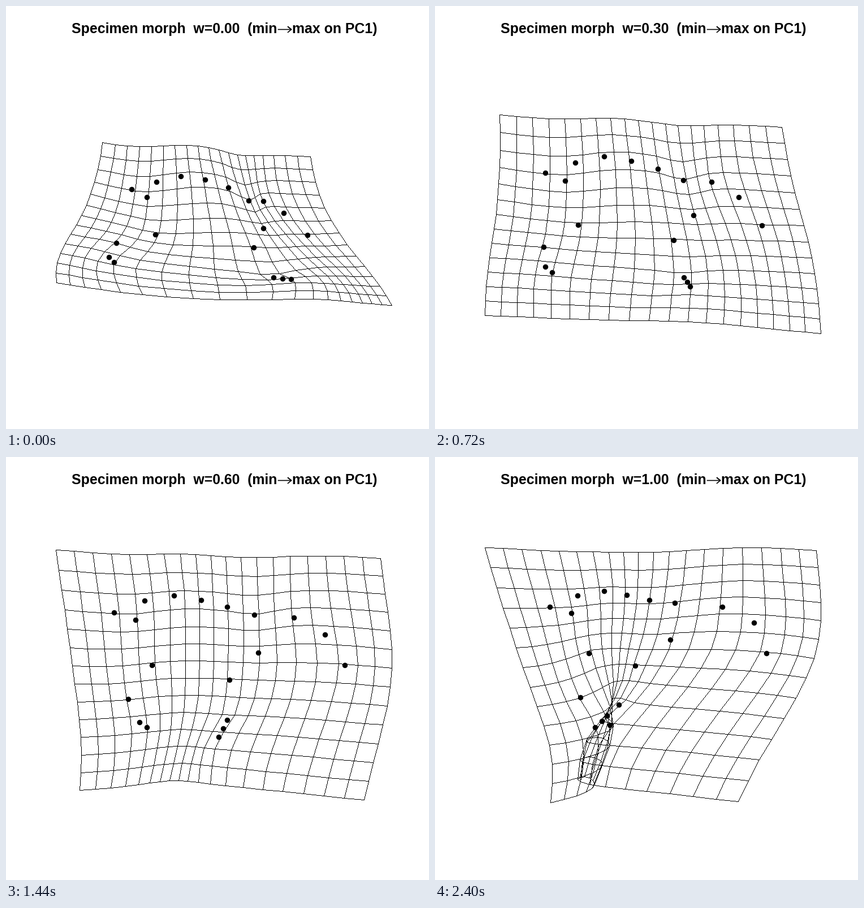
Recreate the animation shown at these times as a matplotlib script. Size 748 px wide and 748 px high, loop 2460 ms.

```python
import numpy as np
import matplotlib.pyplot as plt
from matplotlib.animation import FuncAnimation

SIZE, DPI = 748, 100
PT = 72 / DPI                 # points per pixel
STEPS, INTERVAL = 41, 60
COLS, ROWS = 20, 14
LEFT, WIDTH, MID_Y = 88, 594, 385.2
MAX_SCALE = 0.983             # size of the max shape relative to the min shape

# Handles that bend the grid: flat column, row; x, y at min; x, y at max.
# The first five lie on the rim, the others are landmarks.
RIM = 5
HANDLES = np.array([
    (0, 0, 170, 242, 88, 156),
    (19, 0, 538, 267, 682, 161),
    (0, 13, 88, 490, 205, 613),
    (19, 13, 682, 530, 542, 611),
    (8, 13, 378, 520, 266, 567),
    (3.90, 3.33, 248, 338, 242, 273),
    (6.30, 2.24, 308, 301, 301, 234),
    (9.95, 2.75, 392, 321, 382, 250),
    (11.70, 3.03, 428, 344, 428, 255),
    (14.10, 3.57, 454, 345, 513, 262),
    (16.286, 6.05, 532, 405, 592, 345),
    (10.15, 7.05, 437, 427, 357, 368),
    (4.80, 6.13, 263, 404, 274, 345),
    (3.08, 7.97, 194, 419, 259, 424),
    (3.97, 9.71, 190, 453, 311, 474),
    (10.55, 9.30, 472, 480, 328, 437),
    (10.92, 10.286, 503, 483, 285, 478),
])


def kernel(a, b):
    d2 = ((a[:, None] - b[None]) ** 2).sum(axis=2)
    return d2 * np.log(d2 + 1e-12)


def affine(p):
    return np.column_stack([np.ones(len(p)), p])


def thin_plate(src, dst, pts):
    """Warp pts with the thin-plate spline that takes src to dst."""
    n = len(src)
    system = np.zeros((n + 3, n + 3))
    system[:n, :n] = kernel(src, src)
    system[:n, n:] = affine(src)
    system[n:, :n] = affine(src).T
    rhs = np.vstack([dst, np.zeros((3, dst.shape[1]))])
    weights = np.linalg.solve(system, rhs)
    return np.hstack([kernel(pts, src), affine(pts)]) @ weights


def trace(canvas, line):
    """Draw a one-pixel polyline without smoothing."""
    pts = np.rint(line).astype(int)
    for a, b in zip(pts[:-1], pts[1:]):
        n = max(abs(b - a).max(), 1)
        x, y = np.rint(np.linspace(a, b, n + 1)).astype(int).T
        canvas[y, x] = 0


flat, shapes = HANDLES[:, :2], HANDLES[:, 2:].astype(float)
shapes[:, 2:] *= MAX_SCALE

# the remaining landmarks ride on the bent grid
fixed = flat[RIM:]
between = [(fixed[1] + fixed[2]) / 2, (fixed[-2] + fixed[-1]) / 2]
loose = [(2.714, 2.93), (4.5, 2.37), (15.5, 4.47), (11.9, 5.4), (3.5, 9.37)]
landmarks = np.vstack([fixed, between, loose])

cc, rr = np.meshgrid(np.arange(COLS), np.arange(ROWS))
nodes = np.column_stack([cc.ravel(), rr.ravel()])
warped = thin_plate(flat, shapes, np.vstack([nodes, landmarks]))
at_min, at_max = warped[:, :2], warped[:, 2:]

fig = plt.figure(figsize=(SIZE / DPI, SIZE / DPI), dpi=DPI, facecolor="white")
ax = fig.add_axes([0, 0, 1, 1])
ax.axis("off")
mesh = ax.imshow(np.ones((SIZE, SIZE)), cmap="gray", vmin=0, vmax=1,
                 interpolation="nearest", aspect="auto")
ax.set_xlim(-0.5, SIZE - 0.5)
ax.set_ylim(SIZE - 0.5, -0.5)
dots, = ax.plot([], [], "o", color="black", ms=9.5 * PT, mew=0,
                antialiased=False, zorder=3)

style = dict(va="baseline", color="black", family="Liberation Sans",
             weight="bold", size=24.9 * PT)
title = ax.text(115.5, 47.4, "", ha="left", **style)
ax.text(656, 47.4, "max on PC1)", ha="right", **style)
ax.plot([481, 504, 498, 504, 498], [41, 41, 36, 41, 46],
        color="black", lw=1.6 * PT)


def draw(i):
    w = i / (STEPS - 1)
    shape = (1 - w) * at_min + w * at_max

    # fit the grid to the plot width and centre it vertically
    grid = shape[:len(nodes)]
    low, high = grid.min(axis=0), grid.max(axis=0)
    scale = WIDTH / (high[0] - low[0])
    shift = np.array([LEFT - scale * low[0],
                      MID_Y - scale * (low[1] + high[1]) / 2])
    shape = shape * scale + shift

    grid = shape[:len(nodes)].reshape(ROWS, COLS, 2)
    canvas = np.ones((SIZE, SIZE))
    for line in [*grid, *grid.transpose(1, 0, 2)]:
        trace(canvas, line)
    mesh.set_data(canvas)
    dots.set_data(*shape[len(nodes):].T)
    title.set_text(f"Specimen morph  w={w:.2f}  (min")
    return mesh, dots, title


anim = FuncAnimation(fig, draw, frames=STEPS, interval=INTERVAL,
                     repeat=True, repeat_delay=0, blit=False)
plt.show()
```
